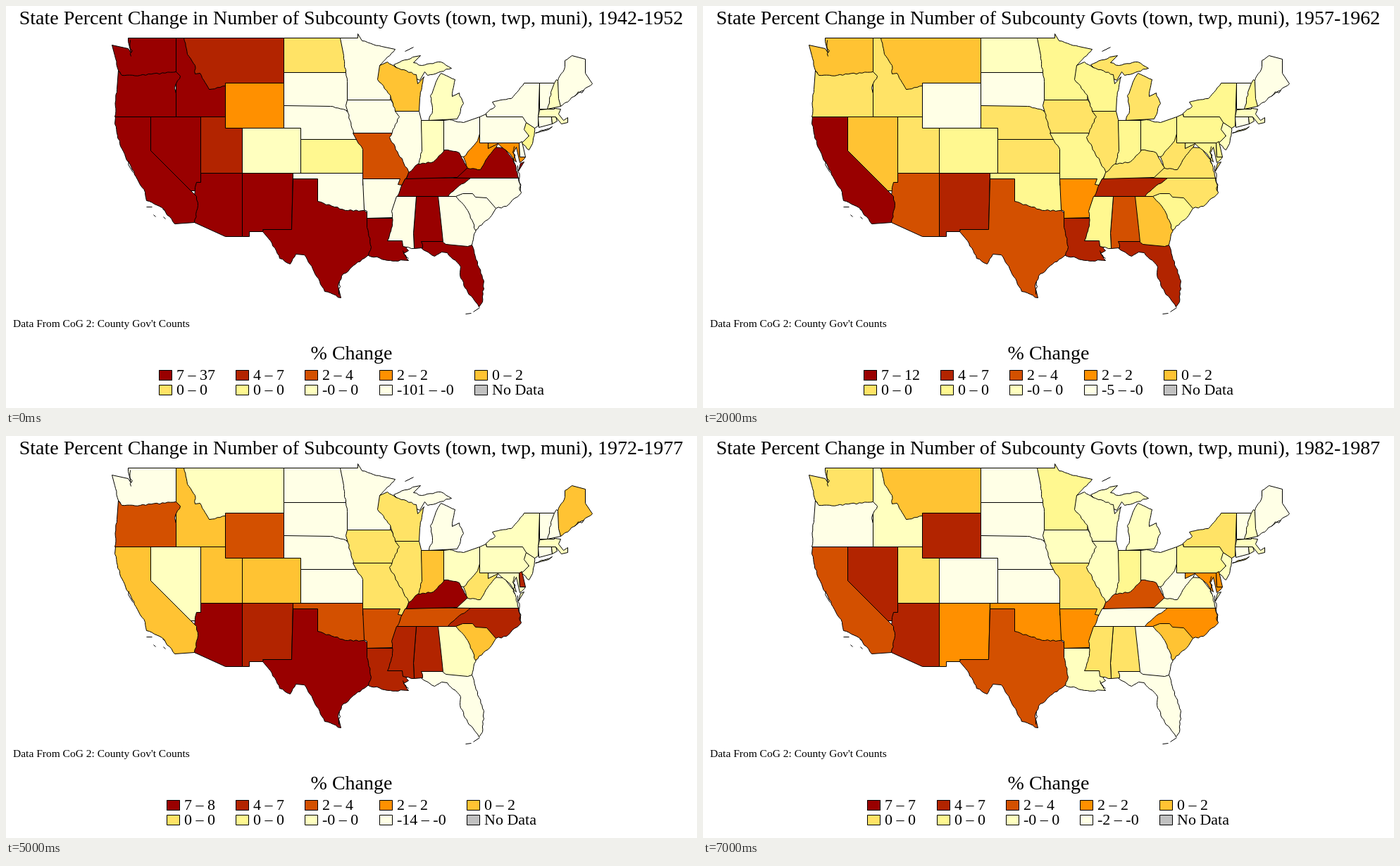
An HTML page with a canvas that plays this animation: 981x571 px, repeating every 8 s.

```html
<!DOCTYPE html>
<html lang="en">
<head>
<meta charset="utf-8">
<title>State Percent Change</title>
<style>
html, body { margin: 0; width: 981px; height: 571px; overflow: hidden; background: #fff; }
canvas { display: block; }
</style>
</head>
<body>
<canvas id="map" width="981" height="571"></canvas>
<script>
const ctx = document.getElementById('map').getContext('2d');
const STEP = 1000;
const COLORS = ['#990000', '#b22400', '#d35000', '#ff9000', '#ffc333',
  '#ffe366', '#fff890', '#ffffbf', '#ffffe6', '#c0c0c0'];
const LIGHTEST = 8;

// States are painted in this order and later ones cover earlier ones, so only the
// later of two neighbors follows the shared border; the other just runs beneath it.
// Two points make a box, "~" a rough river or coast, "/" starts another part.
const OUTLINES = {
  WA: '150,55 173,60 177,66 173,50 173,45 241,45 241,100 165,102 ~159,91 ~154,70',
  NV: '205,157 276,262',
  AZ: '276,237 335,237 335,327 311,327 267,307 265,285 ~268,257 270,250 276,250',
  CA: '155,157 205,157 205,205 270,270 ~272,283 ~267,307 239,309 ~221,286 ~199,276 ~197,264 ~184,242 ~173,221 ~161,195 ~154,167',
  UT: '276,157 335,237',
  MT: '252,45 394,118',
  ID: '241,45 252,45 ~257,68 ~268,84 ~268,96 275,95 ~288,118 ~311,113 311,157 241,157',
  WY: '311,109 394,173',
  OR: '159,91 164,98 ~190,98 ~241,93 247,99 ~239,116 241,124 241,157 154,157 ~157,118',
  CO: '335,173 418,237',
  NM: '335,237 407,237 405,317 364,317 366,320 345,320 345,327 335,327',
  ND: '394,45 486,94',
  SD: '394,94 488,148',
  NE: '394,141 460,142 ~478,146 ~488,151 500,189 418,189 418,173 394,173',
  KS: '418,189 508,237',
  OK: '407,237 508,292',
  TX: '407,245 442,245 442,277 ~466,285 ~485,290 ~508,290 520,300 520,345 ~514,353 ~496,366 ~476,383 ~471,398 475,414 ~452,405 ~435,373 ~423,353 411,352 ~403,366 ~388,358 ~375,333 364,320 365,317 405,317',
  MN: '474,45 499,45 499,39 505,49 ~533,57 552,61 ~530,84 546,125 545,133 484,133 484,107 ~482,94 ~479,70',
  IA: '484,133 546,133 562,160 550,180 493,180 ~485,151 482,141',
  MO: '492,180 547,180 580,222 562,254 506,254 506,203 ~500,195',
  AR: '506,245 559,245 556,253 562,254 562,270 550,300 512,301 512,291 508,289',
  LA: '512,301 550,301 550,333 563,333 ~571,347 564,351 ~571,361 ~545,361 ~514,354 ~518,342 ~512,314',
  MI: '550,83 ~577,72 588,70 578,80 ~590,84 ~617,79 ~632,88 ~598,98 594,93 587,105 560,93 / 600,162 ~605,148 ~602,127 ~613,101 617,95 ~637,104 ~633,128 643,123 ~649,138 ~640,160',
  WI: '530,84 541,79 ~557,88 ~582,97 584,110 593,100 ~587,130 586,149 552,149 ~545,126 ~527,104',
  IL: '552,149 586,149 589,161 592,222 580,238 572,237 ~563,220 ~544,186 ~551,172 ~558,157',
  IN: '589,162 621,162 621,215 600,226 584,226 ~590,206',
  OH: '621,162 629,161 ~649,165 672,157 672,190 655,214 621,212',
  VA: '635,244 690,200 707,201 ~720,218 ~727,244 / 735,221 730,223 727,234',
  FL: '589,334 620,334 655,330 661,339 ~671,371 ~678,390 ~676,420 671,427 ~655,406 ~645,386 ~645,370 ~626,350 618,349 ~608,355 ~589,343',
  AL: '582,270 618,270 625,330 620,334 589,334 ~591,343 579,344 578,322',
  MS: '554,270 582,270 578,322 579,344 ~563,341 562,333 541,333 ~548,312 ~547,291',
  GA: '613,270 645,270 670,300 ~661,339 655,341 624,338 620,335 618,315',
  SC: '638,270 ~655,290 ~666,318 ~689,297 695,287 690,270 650,260',
  NC: '622,270 638,270 648,266 662,266 666,271 682,272 695,287 ~710,284 ~731,265 ~727,244 650,244',
  TN: '566,245 580,243 659,244 ~637,260 ~627,270 555,270 ~560,257',
  KY: '568,245 571,236 ~584,224 ~606,221 ~622,204 ~643,208 ~655,229 640,243',
  WV: '672,181 673,194 700,194 ~685,212 ~673,232 ~655,230 ~649,214 ~669,191',
  MD: '684,194 728,194 729,214 737,214 ~729,222 724,200 720,208 724,221 ~712,207 ~698,195 684,202',
  PA: '672,157 681,153 682,157 745,157 740,194 672,194',
  DE: '728,194 732,192 737,214 729,214',
  NJ: '738,165 750,172 ~747,195 742,204 ~732,194 742,184 735,175',
  NY: '682,157 681,152 ~694,142 690,136 ~717,131 ~735,109 757,109 755,170 750,173 738,165 733,157 / 751,180 ~775,171 770,175',
  CT: '755,157 774,157 775,167 756,172',
  RI: '774,157 780,157 782,163 775,167',
  MA: '757,147 779,145 787,146 784,153 791,162 797,158 797,165 788,167 780,157 755,157',
  VT: '757,109 778,146',
  NH: '778,109 781,104 783,106 787,142 768,146 ~771,133 ~773,122',
  ME: '783,106 ~793,86 793,77 ~803,70 822,75 822,95 832,110 ~806,128 ~787,142 784,131'
};
const INLETS = '176,48 ~177,71 / 174,220 ~180,236 / 473,391 ~472,409 / 806,128 ~820,119 / 721,199 ~722,224 / 726,226 ~729,262 / 563,347 ~571,358';
const ISLANDS = '652,437 660,436 / 663,434 672,428 / 199,285 207,285 / 209,296 212,299 / 222,288 225,290 / 223,299 226,302 / 566,64 578,58';

// States of each period from the darkest class on; the rest are in the lightest.
// A period without groups lies midway between its neighbors.
const PERIODS = [
  { high: 37, low: -101, groups: 'WA OR CA NV ID AZ NM TX LA KY TN AL FL VA/MT UT/MO/WY WV MD/WI/ND/KS NJ/CO MI IN RI MA NH' },
  { high: 13, low: -1, groups: 'CA NV AZ TX LA GA/NM TN AL FL/WA ID AR KY NC VA/OR MT CO KS MO MD/OK MN IA IL WV/UT ND WI MI IN OH/NE PA NY/WY NJ CT RI MA NH' },
  {},
  { high: 10, low: -9, groups: 'CA NM/LA TN FL/AL/TX DE/MT AZ NE AR MS SC/WA UT MI WV NH/KS IA WI IL IN PA NJ NY/OR NV MN OH RI MA' },
  {},
  { high: 8, low: -14, groups: 'AZ TX KY/NM LA MS AL NC DE/OR WY OK AR TN//CA ID UT CO IN SC ME/IA MO WI IL WV//MT NV OH GA VA MD PA NJ NY RI MA' },
  { high: 8, low: -4, groups: 'AZ/TX KY/CA UT NM OK TN MS AL NC/CO WV DE/OR WY MO AR GA FL MD/LA SC/ND MN WI IL MI IN OH PA NJ/WA MT NV NE IA VA CT RI MA VT NH' },
  { high: 7, low: -2, groups: '/NV WY AZ/CA TX KY/NM OK AR NC MD DE/MT SC/WA UT MO MS AL NY/MN IN PA/ID LA WI IL MI OH IA VA NJ RI MA NH' }
];

function between(index, read) {
  const value = i => read(PERIODS[i]);
  return PERIODS[index].groups === undefined
    ? Math.round((value(index - 1) + value(index + 1)) / 2)
    : value(index);
}

function classIn(period, name) {
  const rank = period.groups.split('/').findIndex(group => group.includes(name));
  return rank < 0 ? LIGHTEST : rank;
}

let seed = 7;
function random() {
  seed = (seed * 16807) % 2147483647;
  return seed / 2147483647;
}

// Adds small sideways steps between two points
function roughLine(path, [x0, y0], [x1, y1], amount) {
  const length = Math.hypot(x1 - x0, y1 - y0);
  const pieces = Math.max(2, Math.round(length / 4));
  for (let i = 1; i < pieces; i++) {
    const t = i / pieces, shift = (random() * 2 - 1) * amount / length;
    path.lineTo(x0 + (x1 - x0) * t - (y1 - y0) * shift, y0 + (y1 - y0) * t + (x1 - x0) * shift);
  }
}

function trace(outline, closed = true, amount = 1) {
  const path = new Path2D();
  for (const part of outline.split(' / ')) {
    const words = part.split(' ');
    const points = words.map(word => word.replace('~', '').split(',').map(Number));
    const [[x0, y0], [x1, y1]] = points;
    if (closed && points.length === 2) {
      path.rect(x0, y0, x1 - x0, y1 - y0);
      continue;
    }
    path.moveTo(x0, y0);
    for (let i = 1; i < points.length; i++) {
      if (words[i][0] === '~') roughLine(path, points[i - 1], points[i], amount);
      path.lineTo(...points[i]);
    }
    if (closed) path.closePath();
  }
  return path;
}

const states = Object.entries(OUTLINES).map(([name, outline]) => ({
  path: trace(outline),
  fills: PERIODS.map((_, i) => COLORS[between(i, period => classIn(period, name))])
}));
const details = [trace(INLETS, false, 2.5), trace(ISLANDS, false)];

function setFont(size) {
  ctx.font = `${size}px "Liberation Serif", "Times New Roman", serif`;
}

function text(str, x, y, size, align = 'left') {
  setFont(size);
  ctx.textAlign = align;
  ctx.fillStyle = '#000';
  ctx.fillText(str, x, y);
}

function drawMap(index) {
  ctx.save();
  ctx.translate(0.5, 0.5);
  for (const { path, fills } of states) {
    ctx.fillStyle = fills[index];
    ctx.fill(path);
    ctx.stroke(path);
  }
  details.forEach(path => ctx.stroke(path));
  ctx.restore();
}

function drawLegend(index) {
  const high = between(index, period => period.high);
  const low = between(index, period => period.low);
  const labels = [`7 – ${high}`, '4 – 7', '2 – 4', '2 – 2', '0 – 2',
    '0 – 0', '0 – 0', '-0 – 0', `${low} – -0`, 'No Data'];
  setFont(22);
  const widths = labels.map(label => ctx.measureText(label).width);
  const columns = widths.slice(0, 5).map((width, i) => Math.max(width, widths[i + 5]) + 54.3);
  let left = 489.9 - (columns.reduce((a, b) => a + b) - 30) / 2;
  columns.forEach((column, i) => {
    const x = Math.round(left);
    for (const row of [0, 1]) {
      const k = i + row * 5, y = 517 + row * 21;
      ctx.fillStyle = COLORS[k];
      ctx.fillRect(x, y, 19, 15);
      ctx.strokeRect(x + 0.5, y + 0.5, 18, 14);
      text(labels[k], x + 25, y + 14, 22);
    }
    left += column;
  });
}

function draw(time) {
  const index = Math.floor(time / STEP) % PERIODS.length;
  const end = 1952 + 5 * index;
  const start = index ? end - 5 : 1942;
  ctx.fillStyle = '#fff';
  ctx.fillRect(0, 0, 981, 571);
  ctx.strokeStyle = '#000';
  ctx.lineWidth = 1;
  ctx.lineJoin = 'round';
  text(`State Percent Change in Number of Subcounty Govts (town, twp, muni), ${start}-${end}`, 490, 26, 28, 'center');
  drawMap(index);
  text("Data From CoG 2: County Gov't Counts", 10, 456, 15.5);
  text('% Change', 490.5, 502, 28, 'center');
  drawLegend(index);
}

const origin = performance.now();
function tick() {
  draw(performance.now() - origin);
  requestAnimationFrame(tick);
}
tick();
</script>
</body>
</html>
```
